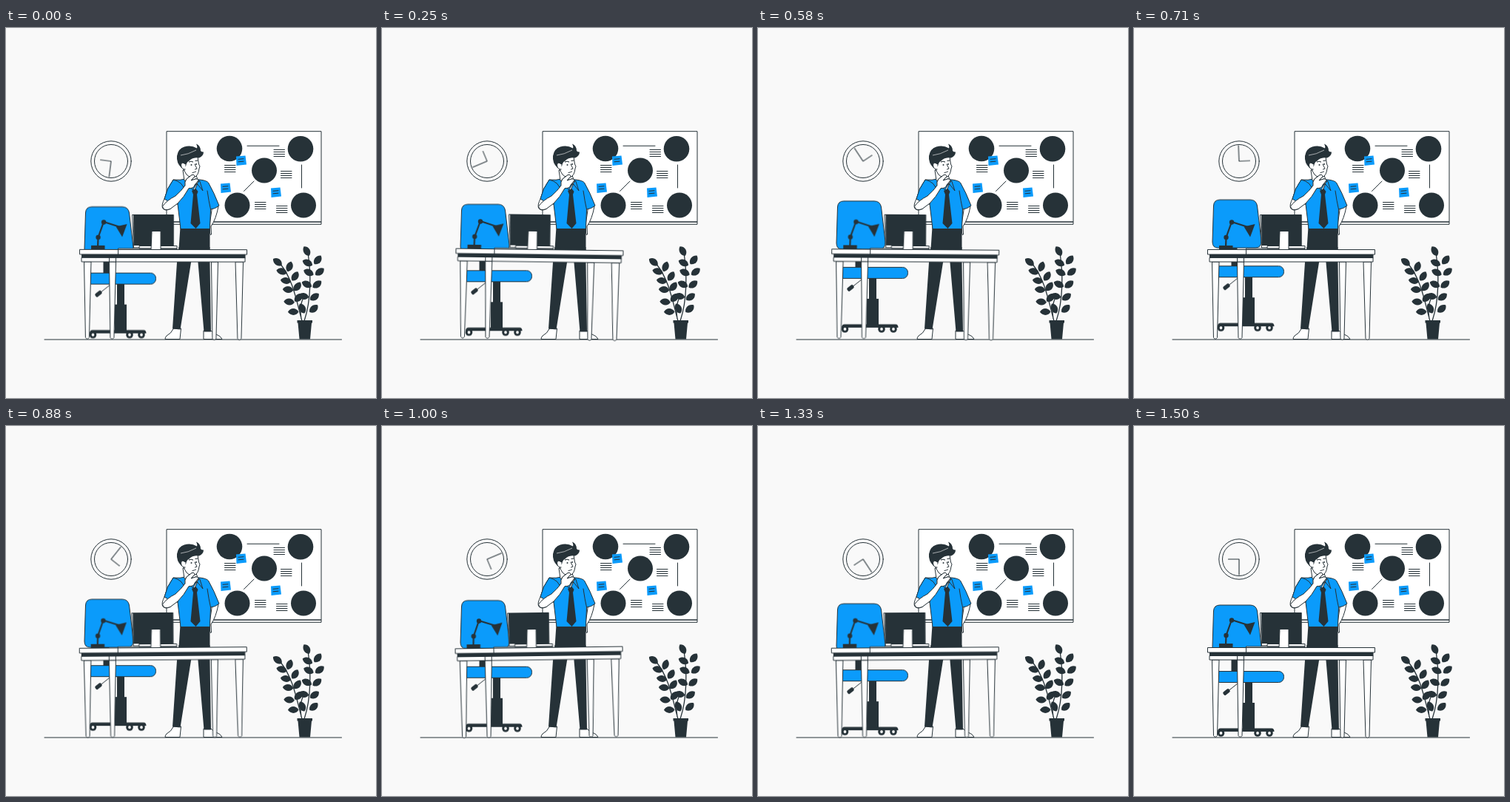
An HTML page without scripts that plays this animation: 500x500 px, repeating every 1540 ms.

```html
<!DOCTYPE html>
<html lang="en">
<head>
<meta charset="utf-8">
<title>Planning at the board</title>
<style>
  :root { --ink: #263238; --blue: #0b9bfb; --loop: 1540ms; }
  html, body { margin: 0; width: 100%; height: 100%; overflow: hidden; background: #f9f9f9; }
  svg { display: block; width: 100%; height: 100%; }
  .line { fill: none; stroke: var(--ink); stroke-linecap: round; stroke-linejoin: round; }
  .paper { fill: #fff; stroke: var(--ink); stroke-linejoin: round; }
  .ink { fill: var(--ink); }
  .blue { fill: var(--blue); }
  .edged { stroke: var(--ink); stroke-linejoin: round; }

  /* Each cycle starts slightly under way and rests briefly at its end. */
  .hands, .chair, .desk { animation: var(--loop) linear infinite; }
  .hands { transform-origin: 142px 180px; animation-name: spin; }
  .chair { animation-name: lift; }
  .desk { transform-origin: 212px 337px; animation-name: sway; }
  @keyframes spin {
    0% { transform: rotate(7deg); }
    95.5%, 100% { transform: rotate(360deg); }
  }
  @keyframes lift {
    0% { transform: translateY(-.4px); }
    46.8% { transform: translateY(-10px); }
    95.5%, 100% { transform: translateY(0); }
  }
  @keyframes sway {
    0% { transform: rotate(.08deg); }
    22.4% { transform: rotate(1deg); }
    71.1% { transform: rotate(-1deg); }
    95.5%, 100% { transform: rotate(0deg); }
  }
</style>
</head>
<body>
<svg viewBox="0 0 500 500">
  <defs>
    <path id="leaf" class="ink" d="M-7 0C-5-5.500 3-7 7.500-1.500C5 5-3 6-7 0Z"/>
    <path id="note" class="line" d="M0 0h14.500M0 3h14.500M0 6h14.500M0 9h14.500"/>
    <g id="sticky">
      <path class="blue" d="M0 1L12.500 0L14 12L.5 13.500Z"/>
      <path class="line" d="M3 4.800l7-.6M3 8.300l7-.6"/>
    </g>
    <g id="wheel">
      <circle class="ink" r="4.800"/>
      <circle r="1.900" fill="#fff"/>
    </g>
  </defs>

  <path class="line" d="M52 421H453.500"/>

  <g id="board">
    <path class="paper" d="M217 139.700H426V262H217ZM217 262H426V265.300H217Z"/>
    <path class="line" d="M326 159.300H369M399.500 185V216M335 207L321.500 220.500"/>
    <g class="ink">
      <circle cx="302" cy="163" r="17.300"/>
      <circle cx="398" cy="163.300" r="17.300"/>
      <circle cx="349" cy="192.500" r="17"/>
      <circle cx="312.500" cy="239.500" r="17"/>
      <circle cx="402" cy="239.500" r="17"/>
    </g>
    <use href="#note" x="362" y="164.500"/>
    <use href="#note" x="295.500" y="185.500"/>
    <use href="#note" x="371.500" y="193.500"/>
    <use href="#note" x="336.500" y="235.500"/>
    <use href="#note" x="365.500" y="240.500"/>
    <use href="#sticky" x="311" y="172.500"/>
    <use href="#sticky" x="290" y="209.500"/>
    <use href="#sticky" x="358" y="215.500"/>
  </g>

  <g id="clock" class="line">
    <circle cx="142" cy="180" r="27.200"/>
    <circle cx="142" cy="180" r="22.500"/>
    <path class="hands" stroke-width="1.100" d="M127.500 180H142V201"/>
  </g>

  <g id="plant">
    <path class="line" stroke-width="1.300" d="M400 396C392 366 387 338 370 318M403 396C413 366 412 330 408 304M399 393Q396 376 402 364"/>
    <use href="#leaf" transform="translate(367.500 316) rotate(-138)"/>
    <use href="#leaf" transform="translate(383.500 323) rotate(-65)"/>
    <use href="#leaf" transform="translate(373 328.500) rotate(-160)"/>
    <use href="#leaf" transform="translate(391 336) rotate(-52)"/>
    <use href="#leaf" transform="translate(378.500 341) rotate(-165)"/>
    <use href="#leaf" transform="translate(394 350) rotate(-48)"/>
    <use href="#leaf" transform="translate(381.500 353) rotate(-170)"/>
    <use href="#leaf" transform="translate(395.500 365) rotate(-40)"/>
    <use href="#leaf" transform="translate(383 369.500) rotate(-170)"/>
    <use href="#leaf" transform="translate(388.500 383) rotate(-175)"/>
    <use href="#leaf" transform="translate(407 301.500) rotate(-115)"/>
    <use href="#leaf" transform="translate(421.500 314) rotate(-45)"/>
    <use href="#leaf" transform="translate(408 317) rotate(-150)"/>
    <use href="#leaf" transform="translate(424 330) rotate(-32)"/>
    <use href="#leaf" transform="translate(409.500 330) rotate(-150)"/>
    <use href="#leaf" transform="translate(420.500 347) rotate(-32)"/>
    <use href="#leaf" transform="translate(407 346) rotate(-150)"/>
    <use href="#leaf" transform="translate(417 364) rotate(-30)"/>
    <use href="#leaf" transform="translate(402.500 362) rotate(-165)"/>
    <use href="#leaf" transform="translate(416 380) rotate(-35)"/>
    <use href="#leaf" transform="translate(401 379) rotate(-110)"/>
    <path class="ink" d="M393.500 395H414V398.500H413L411 420.500H396.500L394.500 398.500H393.500Z"/>
  </g>

  <g class="chair">
    <path class="ink" d="M131.500 300H139.500V333H131.500Z"/>
    <path class="blue edged" d="M116 242H157Q165 242 166.500 250L172 297Q172.500 307 164 307H114Q106 307 106 299L107.500 250Q108 242 116 242Z"/>
    <path class="line" d="M140 348L128 357.500"/>
    <rect class="ink" x="-5" y="-2.600" width="10" height="5.200" rx="2" transform="translate(125 359.500) rotate(-38)"/>
    <path class="ink" d="M150 346H160V374H163V408.500H186Q189.500 408.500 189.500 413H113Q113 408.500 117 408.500H147V374H150Z"/>
    <rect class="blue edged" x="109" y="331.500" width="93.500" height="15" rx="7"/>
    <use href="#wheel" x="117.500" y="415"/>
    <use href="#wheel" x="167" y="415"/>
    <use href="#wheel" x="183" y="415"/>
  </g>

  <g id="man">
    <path class="paper" d="M226.500 406Q223 413 217 416Q215 418 215 420.500H235L236.500 406Z"/>
    <path class="paper" d="M267 409V420.500H292Q290 416 285 414.500Q280 413 277 409Z"/>
    <path class="ink" d="M235.500 269H275.500V317L277 410.500H267.500L259.500 317V300H253.500L250 317L235.500 407.500L225 406.500L231 317L233.500 299Z"/>
    <path class="ink" d="M233.500 296H275.500V309H232Z"/>
    <path class="paper" d="M287 241Q284 258 277 268L277.500 279Q276 281 275.500 277V263L278.500 243Z"/>
    <path class="blue edged" d="M226 205Q236 206 242 204L262 205Q271 206 273.500 209Q281 222 288 240Q283 244.500 276.500 245L275.500 271.500H236L232 238Q222 236 214 231Q217 217 226 205Z"/>
    <path class="line" d="M272 220Q274 234 276.500 245M232 238L236 224"/>
    <path class="paper" d="M239 192L241 206L255 219L260 208L256 196Z"/>
    <g id="head">
      <path class="paper" d="M238 178Q239 192 244 198Q249 203 255 201.500Q260 199 261 190L262 187L260.500 184L259 174Z"/>
      <path class="ink" d="M237 189Q230 182 231 173Q232.500 163 241 160.500Q250 157.500 258 162.500Q259 160.500 257 156.500Q263 159 263 166Q265 168 267 167.500Q267 173 261 175.500Q252 174 247 180Q244 181 243 187Z"/>
      <path class="paper" d="M242.500 184Q237 180 236.500 185Q237 191.500 242.500 191"/>
      <path d="M236 172Q246 171 257 165" fill="none" stroke="#fff" stroke-width=".6"/>
      <path class="line" stroke-width="1.200" d="M247.500 181Q250 179.500 252.500 181M256 179.500L259 179"/>
      <circle class="ink" cx="250.500" cy="185" r="1"/>
      <circle class="ink" cx="257" cy="184" r="1"/>
      <path class="line" d="M255 184L258 190L255.500 191M252 195.500Q255 195 256.500 194"/>
    </g>
    <path class="blue edged" d="M242 206L252.500 219L258 210L266 220L261.500 206L257 212Z"/>
    <path class="ink" d="M251 220L256.500 217L259.500 221L258 225L262.500 264L256.500 271L249.500 264L253 225Z"/>
    <path class="paper" d="M214 231Q210 239 211.500 243Q214 248 222 244.500Q238 232 247 216.500Q254 217 255 212L260 206Q260 203 256 204L250 206L255 200.500Q254 197 250.500 199L244 204Q241 208 242 213Q236 222 228 229Z"/>
    <path class="blue edged" d="M226 205Q217 217 214 231Q222 237 231.500 238L241 219Q239 208 226 205Z" stroke="none"/>
    <path class="paper" d="M232 237Q241 228 247 216.500Q254 217 255 212L260 206Q260 203 256 204L250 206L255 200.500Q254 197 250.500 199L244 204Q241 208 242 213Q237 220 229 227Q217 233 211.500 241Q213 248 222 244.500Z"/>
  </g>

  <g class="desk">
    <g id="legs" class="paper">
      <path d="M105.500 316H115L112.500 418.500Q110 422 107.500 418.500Z"/>
      <path d="M139.500 316H148.500L146 418.500Q143.500 422 141 418.500Z"/>
      <path d="M277.500 316H286.500L284 419.500Q281.500 423 279 419.500Z"/>
      <path d="M310 316H320.500L318 419.500Q315.500 423 313 419.500Z"/>
    </g>
    <path class="ink" d="M102 305.500H323.500V311H102Z"/>
    <path class="paper" d="M102 310.500H323V316H102ZM99.500 299.500H325.500V306H99.500Z"/>
    <path class="line" d="M151.500 299.500V306M139.500 310V316M148.500 310V316"/>

    <g id="monitor">
      <path class="paper" d="M170.500 252.500H226V297H172.500Z"/>
      <path class="ink" d="M172 252H226.500V294H172.500Z"/>
      <path class="paper" d="M151.500 298H231V299.500H151.500ZM180 294.500H231V298H180Z"/>
      <path class="paper" d="M197 274.500H209V299.500H196Z"/>
    </g>

    <g id="lamp">
      <path class="line" stroke-width="2.200" d="M124 296L124.500 283L132 262L154 269"/>
      <circle class="ink" cx="124.500" cy="283" r="3.200"/>
      <circle class="ink" cx="132" cy="262.500" r="3.200"/>
      <path class="ink" d="M148.500 268.500L163.500 265L157 282.500Z"/>
      <path class="ink" d="M115 294H133.500V299.500H115Z"/>
    </g>
  </g>
</svg>
</body>
</html>
```
